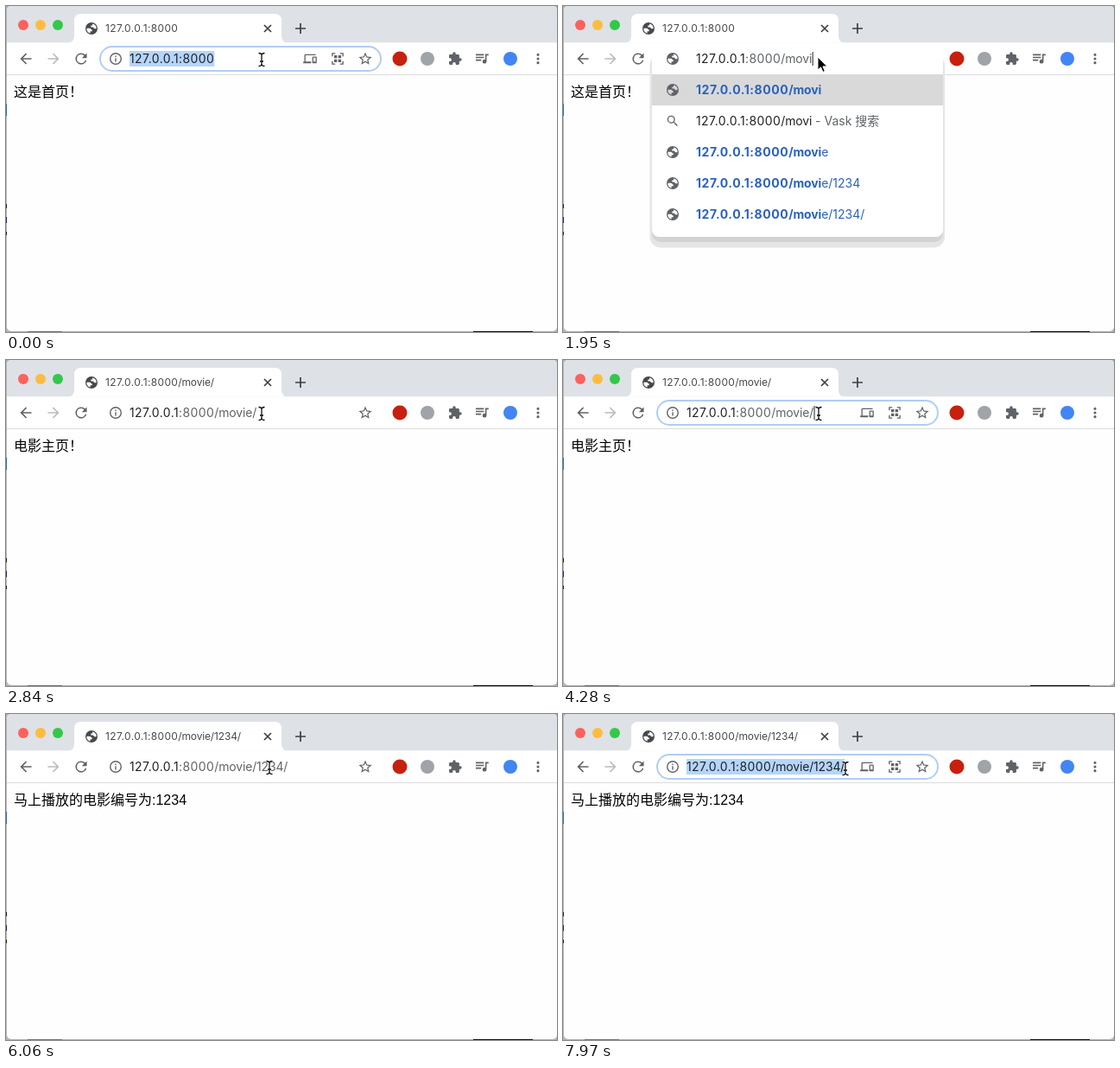
These frames come from a looping animation (638 px wide and 377 px high, 8 s). An HTML page:

```html
<!DOCTYPE html>
<html lang="zh-CN">
<head>
<meta charset="utf-8">
<title>Browser navigation</title>
<style>
html, body { margin: 0; width: 100%; height: 100%; overflow: hidden; }
svg { display: block; width: 638px; height: 377px; background: #b4b4b4; }
text { font: 14px Inter, "Noto Sans CJK SC", sans-serif; font-feature-settings: "calt" 0; }
text.tab { font-size: 12px; fill: #45494d; }
text.page { font: 16px "Liberation Sans", "Noto Sans CJK SC", sans-serif; }
.host { letter-spacing: .03em; }
.path { letter-spacing: -.012em; }
.dark { fill: #202124; }
.grey { fill: #5f6368; }
.link { fill: #2a62bd; }
.bold { font-weight: 700; }
.bold.host { letter-spacing: .04em; }
</style>
</head>
<body>
<svg viewBox="0 0 638 377">
  <g id="frame"></g>
  <g id="view"></g>
  <g id="popup"></g>
  <g id="cursor"></g>
</svg>
<script>
const LOOP = 8000, HOST = '127.0.0.1', PORT = ':8000';
const HISTORY = ['/movie', '/movie/1234', '/movie/1234/'];
const PAGES = { '': '这是首页！', '/movie/': '电影主页！', '/movie/1234/': '马上播放的电影编号为:1234' };
const $ = id => document.getElementById(id);

// 24-unit icon outlines
const ICONS = {
  globe: 'M12 2a10 10 0 1 0 0 20 10 10 0 0 0 0-20zM4 11.5h5c2.5 0 2 2.5 4 2.5v2.5h-3v3.3A8 8 0 0 1 4 11.5zM13.5 4.2A8 8 0 0 1 20 12.5h-2.5c-2 0-1.5-2.5-3.5-2.5h-3V7h2.5z',
  back: 'M20 11H7.83l5.59-5.59L12 4l-8 8 8 8 1.41-1.41L7.83 13H20z',
  forward: 'M4 11h12.17l-5.59-5.59L12 4l8 8-8 8-1.41-1.41L16.17 13H4z',
  reload: 'M17.65 6.35A8 8 0 1 0 19.73 14h-2.08A6 6 0 1 1 12 6c1.66 0 3.14.69 4.22 1.78L13 11h7V4z',
  info: 'M11 7h2v2h-2zm0 4h2v6h-2zm1-9a10 10 0 1 0 0 20 10 10 0 0 0 0-20zm0 18a8 8 0 1 1 0-16 8 8 0 0 1 0 16z',
  devices: 'M4 6h18V4H4c-1.1 0-2 .9-2 2v11H0v3h14v-3H4zm19 2h-6c-.55 0-1 .45-1 1v10c0 .55.45 1 1 1h6c.55 0 1-.45 1-1V9c0-.55-.45-1-1-1zm-1 9h-4v-7h4z',
  scan: 'M2 8V2h6v2H4v4zM16 2h6v6h-2V4h-4zM2 16h2v4h4v2H2zM20 16h2v6h-6v-2h4zM6 6h5v5H6zM13 6h5v5h-5zM6 13h5v5H6zM13 13h5v5h-5z',
  star: 'M22 9.24l-7.19-.62L12 2 9.19 8.63 2 9.24l5.46 4.73L5.82 21 12 17.27 18.18 21l-1.63-7.03zM12 15.4l-3.76 2.27 1-4.28-3.32-2.88 4.38-.38L12 6.1l1.71 4.04 4.38.38-3.32 2.88 1 4.28z',
  puzzle: 'M20.5 11H19V7c0-1.1-.9-2-2-2h-4V3.5a2.5 2.5 0 0 0-5 0V5H4c-1.1 0-2 .9-2 2v3.8h1.5a2.7 2.7 0 0 1 0 5.4H2V20c0 1.1.9 2 2 2h3.8v-1.5a2.7 2.7 0 0 1 5.4 0V22H17c1.1 0 2-.9 2-2v-4h1.5a2.5 2.5 0 0 0 0-5z',
  queue: 'M15 6H3v2h12zm0 4H3v2h12zM3 16h8v-2H3zM17 6v8.18A3 3 0 1 0 19 17V8h3V6z',
  more: 'M12 8a2 2 0 1 0 0-4 2 2 0 0 0 0 4zm0 2a2 2 0 1 0 0 4 2 2 0 0 0 0-4zm0 6a2 2 0 1 0 0 4 2 2 0 0 0 0-4z',
  search: 'M15.5 14h-.79l-.28-.27a6.5 6.5 0 1 0-.7.7l.27.28v.79l5 4.99L20.49 19zm-6 0a4.5 4.5 0 1 1 0-9 4.5 4.5 0 0 1 0 9z'
};

const icon = (name, x, y, scale = .7, fill = '#5f6368') =>
  `<path d="${ICONS[name]}" fill="${fill}" fill-rule="evenodd" transform="translate(${x} ${y}) scale(${scale}) translate(-12 -12)"/>`;
const rect = (x, y, w, h, fill, r = 0, extra = '') =>
  `<rect x="${x}" y="${y}" width="${w}" height="${h}" rx="${r}" fill="${fill}" ${extra}/>`;
const disc = (x, y, r, fill) => `<circle cx="${x}" cy="${y}" r="${r}" fill="${fill}"/>`;
const text = (x, y, cls, body, extra = '') => `<text x="${x}" y="${y}" class="${cls}" ${extra}>${body}</text>`;
const span = (cls, body) => `<tspan class="${cls}">${body}</tspan>`;
const address = (path, hostCls = '', restCls = hostCls) =>
  span('host ' + hostCls, HOST) + span('host ' + restCls, PORT) + span('path ' + restCls, path);

$('frame').innerHTML =
  rect(0, 113, 1, 14, '#2a6db0') + rect(0, 229, 1, 5, '#222') + rect(0, 244, 1, 7, '#1c2a66') + rect(0, 261, 1, 4, '#222') +
  rect(25, 376, 40, 1, '#777') + rect(541, 376, 69, 1, '#111') +
  rect(1, 0, 637, 376, '#fefefe', 5) +
  '<path d="M1 42.5V5q0-5 5-5H633q5 0 5 5V42.5z" fill="#dee1e6"/>' +
  '<path d="M71 42.5q8 0 8-8V17q0-8 8-8H311q8 0 8 8V34.5q0 8 8 8z" fill="#fff"/>' +
  rect(1, 42.5, 637, 36.5, '#fff') + rect(1, 79, 637, 1, '#dcdcdc') +
  disc(20, 22, 6, '#fc615d') + disc(40, 22, 6, '#fdbc40') + disc(60, 22, 6, '#34c84a') +
  icon('globe', 99, 26, .7, '#45494d') +
  '<path d="M299 22l8 8m0-8l-8 8M335 26h12m-6-6v12" stroke="#3c4043" stroke-width="1.7"/>' +
  icon('back', 23, 61, .82) + icon('forward', 55, 61, .82, '#babcbe') + icon('reload', 87, 61, .82) +
  disc(456, 61, 8.5, '#c8200e') + disc(488, 61, 8, '#a0a4a9') + disc(584, 61, 8, '#4285f4') +
  icon('puzzle', 520, 61) + icon('queue', 551, 60.3, .78) + icon('more', 616, 61, .78);

// time, address bar mode, typed path, loaded path
const STEPS = [
  [0, 'selected', '', ''], [170, 'caret', '', ''], [650, 'focus', '', ''],
  [1070, 'typing', '/', ''], [1430, 'typing', '/m', ''], [1600, 'typing', '/mo', ''],
  [1780, 'typing', '/mov', ''], [1950, 'typing', '/movi', ''], [2190, 'typing', '/movie', ''],
  [2670, 'idle', '/movie/', '/movie/'], [3740, 'selected', '/movie/', '/movie/'], [4280, 'caret', '/movie/', '/movie/'],
  [4760, 'typing', '/movie/1', '/movie/'], [4940, 'typing', '/movie/12', '/movie/'],
  [5120, 'typing', '/movie/123', '/movie/'], [5350, 'typing', '/movie/1234', '/movie/'],
  [5650, 'idle', '/movie/1234/', '/movie/1234/'], [6530, 'selected', '/movie/1234/', '/movie/1234/']
];
// time, x, y of the pointer
const MOVES = [
  [0, 296, 62], [6060, 305, 62], [6120, 313, 62], [6180, 322, 62], [6230, 330, 62], [6290, 335, 62],
  [7370, 338, 67], [7430, 341, 73], [7910, 334, 67], [7970, 327, 63]
];
const at = (list, t) => list.findLast(item => item[0] <= t);

function drawView([, mode, path, loaded]) {
  const focused = mode === 'selected' || mode === 'caret' || mode === 'focus';
  let out = text(115, 30, 'tab', address(loaded)) + text(9, 105, 'page', PAGES[loaded]);
  if (mode !== 'typing') {
    out += rect(109, 47, 325, 28, '#fff', 14, 'id="pill"' + (focused ? ' stroke="#b1cdf5" stroke-width="2"' : '')) +
      icon('info', 127, 61) + icon('star', 416, 61, .76) + rect(143, 52, 0, 18, '#b4d5fe', 0, 'id="mark"') +
      text(143, 66, '', address(path, 'dark', mode === 'selected' ? 'dark' : 'grey'), 'id="url"');
    if (focused) out += icon('devices', 352, 61, .65) + icon('scan', 384, 61, .68);
  }
  $('view').innerHTML = out;
  if (mode === 'selected') $('mark').setAttribute('width', $('url').getComputedTextLength());
  if (mode === 'caret') addCaret('view', 143, $('url'));
}

function addCaret(group, x, node) {
  $(group).insertAdjacentHTML('beforeend', rect(x + node.getComputedTextLength() + .5, 53, 1, 16, '#222'));
}

function drawPopup(path) {
  let found = HISTORY.filter(item => item.startsWith(path) && item !== path);
  if (path === '/') found = found.slice(-2);
  const rows = [path, null, ...found], bottom = 87 + 36 * rows.length;
  let out = rect(100.5, 56, 341.5, bottom - 43.5, '#e5e5e5', 13) + rect(103, 60, 337, bottom - 54, '#d3d3d3', 10) +
    rect(103, 46, 337, bottom - 46, '#fff', 8) + rect(103, 79, 337, 36, '#d9d9d9') +
    icon('globe', 127, 61) + text(154, 66, '', address(path, 'dark', 'grey'), 'id="typed"');
  rows.forEach((row, i) => {
    const y = 97 + 36 * i, body = row === null
      ? address(path, 'dark') + span('grey', ' - Vask 搜索')
      : address(path, 'link bold') + span('link', row.slice(path.length));
    out += icon(row === null ? 'search' : 'globe', 127, y) + text(154, y + 5, '', body);
  });
  $('popup').innerHTML = out;
  addCaret('popup', 154, $('typed'));
}

const BEAM = 'M-3.5-7.5Q0-7.5 0-5Q0-7.5 3.5-7.5M0-5V5M-3.5 7.5Q0 7.5 0 5Q0 7.5 3.5 7.5M-2 2H2';
const ARROW = '<path d="M295 59v15l3.5-3.2 2.4 5.6 2.4-1-2.4-5.5h4.9z" fill="#000" stroke="#fff"/>';
const beam = (x, y) => `<g transform="translate(${x} ${y})" fill="none">` +
  `<path d="${BEAM}" stroke="#fff" stroke-width="3"/><path d="${BEAM}" stroke="#111" stroke-width="1.3"/></g>`;

let shown, pointer;
function render(t) {
  const step = at(STEPS, t), [start, mode, path] = step, move = at(MOVES, t);
  if (step !== shown) {
    drawView(step);
    if (mode === 'typing') drawPopup(path);
    else if (mode === 'idle') drawPopup(STEPS[STEPS.indexOf(step) - 1][2]);
    else $('popup').innerHTML = '';
  }
  // The list fades out after a page is opened
  const fade = mode === 'idle' ? Math.max(0, 1 - (t - start + 60) / 170) : 1;
  $('popup').setAttribute('opacity', fade);
  if (mode === 'idle') {
    const hover = Math.min(1, Math.max(0, (t - 6060) / 230));
    $('pill').setAttribute('fill', `rgb(${255 - 14 * hover},${255 - 12 * hover},${255 - 11 * hover})`);
  }
  if (step !== shown || move !== pointer)
    $('cursor').innerHTML = mode === 'typing' ? ARROW : beam(move[1], move[2]);
  shown = step;
  pointer = move;
}

const origin = performance.now();
function tick() {
  render((performance.now() - origin) % LOOP);
  requestAnimationFrame(tick);
}
tick();
</script>
</body>
</html>
```
